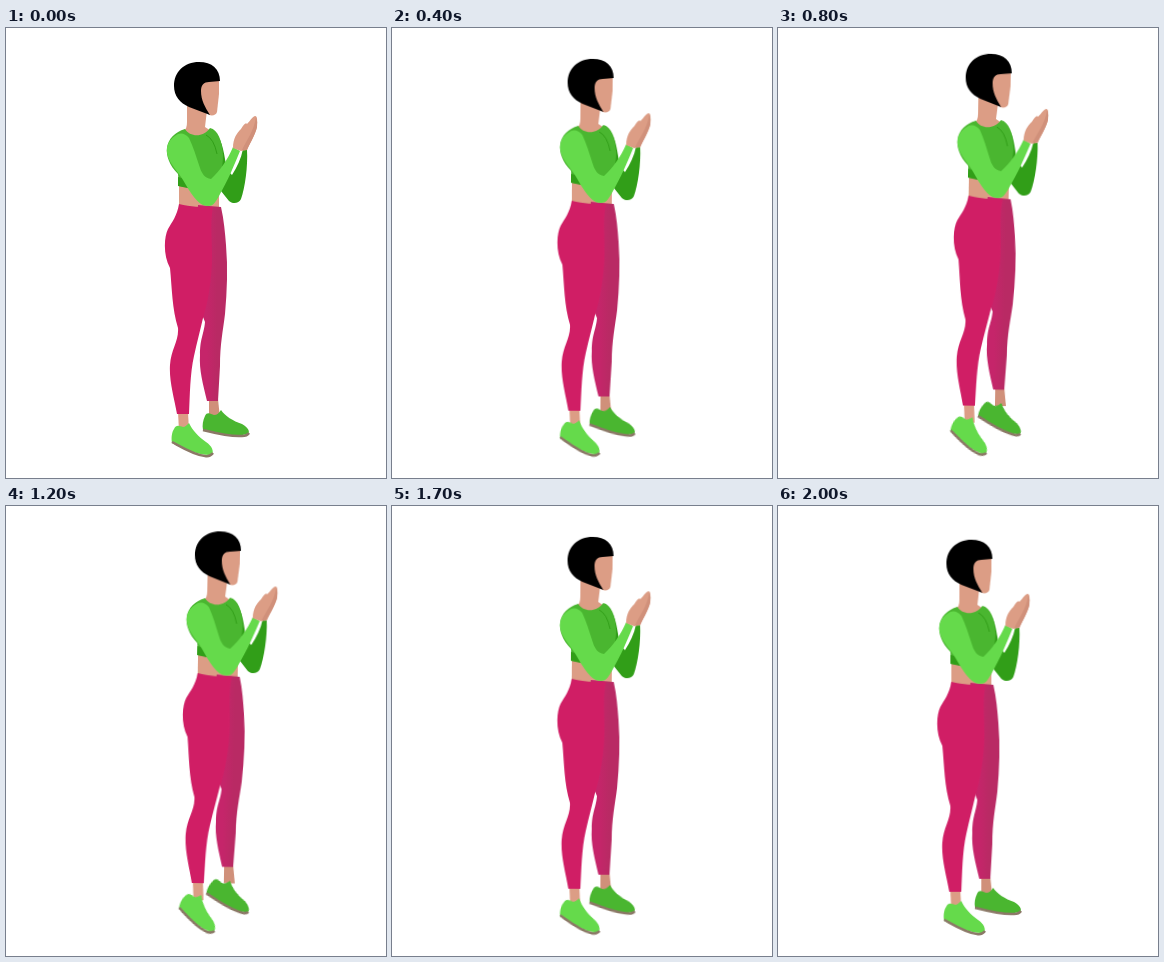
An HTML page without scripts for the animation above (2100 ms loop, 380x450 px).

```html
<!DOCTYPE html>
<html lang="en">
<head>
<meta charset="utf-8">
<title>Calf raise</title>
<style>
html, body { margin: 0; width: 100%; height: 100%; overflow: hidden; background: #fff; }
svg { display: block; width: 380px; height: 450px; }

/* Everything leans from the waist; the feet pivot on their toes */
.move { animation: 1.05s cubic-bezier(.4, 0, .5, 1) infinite alternate; }
.figure { transform-origin: 194px 177px; animation-name: lean; }
.far-leg { transform-origin: 194px 177px; animation-name: shorten; }
.far-shoe { transform-origin: 243px 406px; animation-name: far-lift; }
.near-shoe { transform-origin: 207px 427px; animation-name: near-lift; }

@keyframes lean { to { transform: translate(19.3px, -8.8px) rotate(1.1deg); } }
@keyframes shorten { to { transform: scaleY(.98); } }
@keyframes far-lift { to { transform: translate(-1px, 1px) rotate(21deg); } }
@keyframes near-lift { to { transform: translate(1px, 0) rotate(19deg); } }

.skin { fill: #dc9d85; }
.shade { fill: #d0907a; }
.pink { fill: #d01e65; }
.light { fill: #65da4b; }
.mid { fill: #4ab630; }
.dark { fill: #319e18; }
.sole { fill: none; stroke: #8b7866; stroke-width: 2.5; }
</style>
</head>
<body>
<svg viewBox="0 0 380 450" role="img" aria-label="Woman doing calf raises">
  <defs>
    <linearGradient id="far">
      <stop offset=".3" stop-color="#c5256a"/>
      <stop offset=".65" stop-color="#b92a64"/>
    </linearGradient>
  </defs>

  <g class="move figure">
    <!-- Waist and far arm -->
    <path class="skin" d="M173 155H213V181H173Z"/>
    <path class="dark" d="M210 106C217 113 218 127 221 142L226 147C231 139 235 131 237 121L241 122C242 138 239 160 235 171C233 176 226 176 223 173L211 158Z"/>

    <!-- Legs -->
    <g class="move far-leg">
      <path class="shade" d="M203 371H212L214 390H203Z"/>
      <path fill="url(#far)" d="M192 177L215 179C218 192 219 205 220 217C222 240 221 263 219 286C217 303 214 316 214 338L212 373H201C197 356 193 342 194 327C194 310 198 306 199 294L195 284Z"/>
    </g>
    <path class="skin" d="M172 384H182L183 403H173Z"/>
    <path class="pink" d="M173 176C185 179 195 179 207 179C204 194 206 211 206 229C206 250 202 275 197 290C194 303 191 314 188 328C184 346 184 366 183 386H171C168 369 163 353 164 337C165 321 173 313 172 300C166 281 166 260 164 240C157 227 158 209 162 201C166 194 171 188 173 176Z"/>

    <!-- Torso and near arm -->
    <path class="skin" d="M181 75L201 82L199 99L205 103C199 112 185 111 178 102Q181 101 181 94Z"/>
    <path class="mid" d="M179 101C184 109 197 110 204 100C212 102 216 112 217 127C217 139 214 148 213 159Q192 162 173 158L172 146C163 137 160 127 161 120C162 111 169 104 179 101Z"/>
    <path class="dark" d="M172 149L186 153V161L172 158Z"/>
    <path fill="none" stroke="#319e18" d="M200 107Q208 111 211 126"/>
    <path class="light" d="M172 106C163 111 160 118 161 125C163 136 172 143 177 152C184 164 192 178 202 178C207 178 209 175 213 168C222 152 228 138 234 123L227 119C222 131 214 143 205 151C199 150 196 146 194 140C190 128 187 118 183 110Q178 104 172 106Z"/>

    <!-- Hands -->
    <path class="skin" d="M227 120C227 110 231 105 235 101C238 96 240 94 241 96C244 93 246 89 249 88C252 88 251 94 251 99C249 107 245 113 241 122L235 123Z"/>
    <path class="shade" d="M250 89Q252 94 251 99C249 107 245 113 241 122H236C241 111 248 103 250 89Z"/>

    <!-- Head -->
    <path class="skin" d="M193 52H213L213 66L211 84C210 87 207 88 203 87L194 72Z"/>
    <path d="M214 53C214 41 206 34 193 34C178 34 168 44 168 58C168 68 174 75 183 79L204 87C199 79 195 72 195 63C195 57 198 54 203 54Z"/>
  </g>

  <!-- Shoes -->
  <g class="move far-shoe">
    <path class="mid" d="M199 388C201 383 205 386 208 387C211 387 213 385 215 382C219 388 227 393 236 396C243 400 244 404 242 406C230 409 209 406 197 402C196 397 197 392 199 388Z"/>
    <path class="sole" d="M197 402C209 405 224 409 236 408Q241 408 243 405"/>
  </g>
  <g class="move near-shoe">
    <path class="light" d="M168 401C170 396 174 398 177 399C179 399 181 397 183 395C186 402 193 409 200 414C206 418 208 423 206 427C195 428 177 421 166 415C165 409 166 404 168 401Z"/>
    <path class="sole" d="M166 414C177 420 188 427 199 428Q204 429 207 425"/>
  </g>
</svg>
</body>
</html>
```
